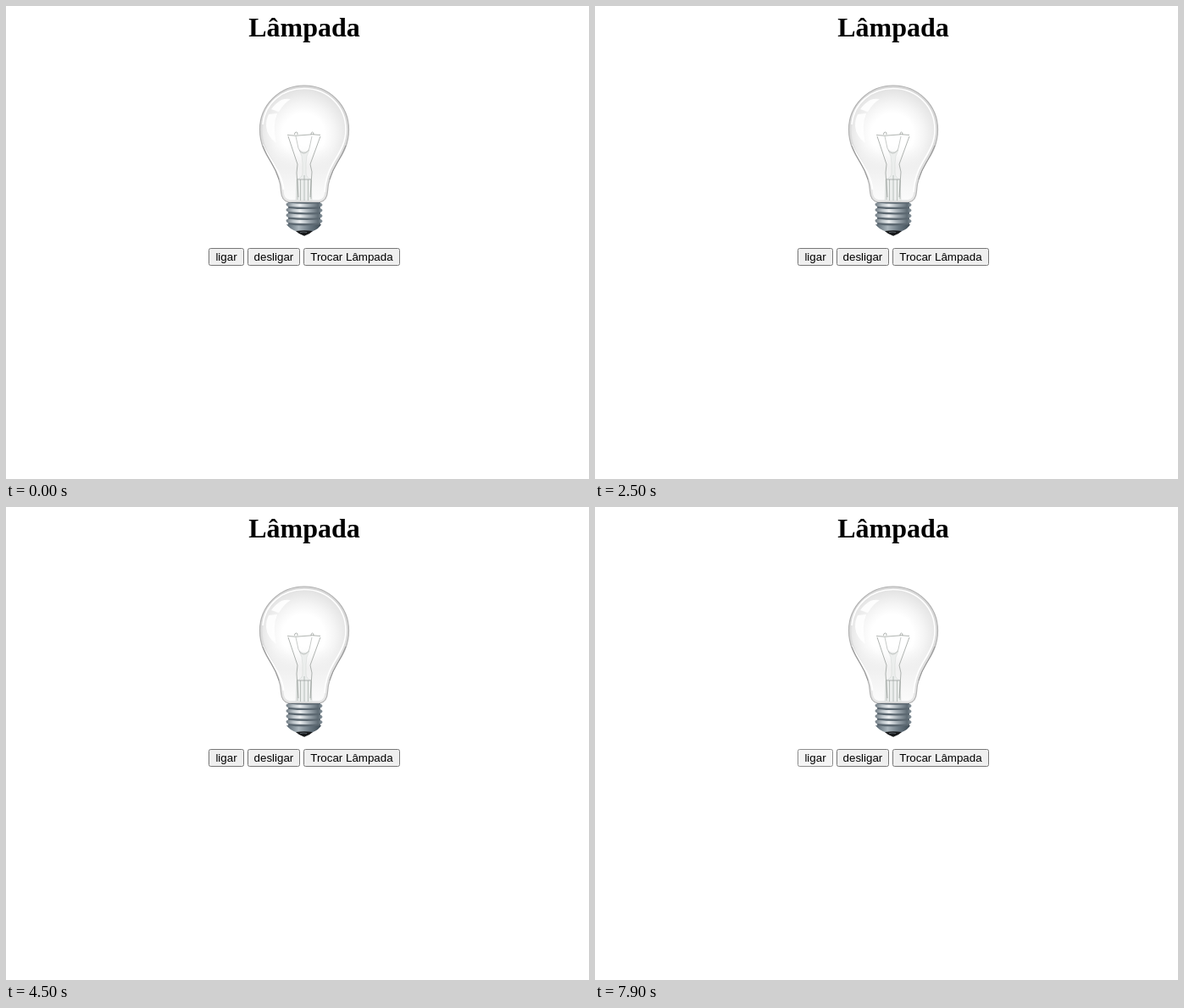
These frames come from a looping animation (688x559 px, 8000 ms). An HTML page:

```html
<!DOCTYPE html>
<html lang="pt">
<head>
<meta charset="utf-8">
<title>Lâmpada</title>
<style>
  html, body { margin: 0; width: 100%; height: 100%; overflow: hidden; background: #fff; }
  h1, svg, .row { position: absolute; margin: 0; pointer-events: none; }
  h1, .row { left: 16px; right: 0; text-align: center; white-space: nowrap; }
  h1 { top: 7px; font: bold 32px/37px "Liberation Serif", "Times New Roman", serif; color: #000; }
  svg { left: 0; top: 0; width: 100%; height: 100%; }
  .row { top: 286px; height: 21px; font: 16px/21px "Liberation Serif", "Times New Roman", serif; }
  button {
    appearance: none; box-sizing: border-box; height: 21px; margin: 0; padding: 2px 7px;
    vertical-align: top; color: #000; background: #efefef;
    border: 1px solid #767676; border-radius: 2.5px;
    font: 13.3333px/15px "Liberation Sans", Arial, sans-serif;
  }
</style>
</head>
<body>
<h1>Lâmpada</h1>

<svg viewBox="0 0 688 559" fill="none">
  <defs>
    <path id="glass" d="M352 94C381 94 404.500 117 404.500 146C404.500 163 398 174 391 185C383 198 380 207 379.500 219C379 227 376 231 370 232H334C328 231 325 227 324.500 219C324 207 321 198 313 185C306 174 299.500 163 299.500 146C299.500 117 323 94 352 94Z"/>
    <clipPath id="inside"><use href="#glass"/></clipPath>
    <radialGradient id="grayBall" gradientUnits="userSpaceOnUse" cx="351" cy="152" r="60">
      <stop offset=".42" stop-color="#fff"/>
      <stop offset=".62" stop-color="#f5f5f5"/>
      <stop offset=".85" stop-color="#e6e6e6"/>
      <stop offset="1" stop-color="#d8d8d8"/>
    </radialGradient>
    <linearGradient id="grayNeck" gradientUnits="userSpaceOnUse" x1="0" y1="165" x2="0" y2="232">
      <stop stop-color="#f3f3f3" stop-opacity="0"/>
      <stop offset=".4" stop-color="#f0f0f0"/>
      <stop offset="1" stop-color="#fcfcfc"/>
    </linearGradient>
    <radialGradient id="halo" gradientUnits="userSpaceOnUse" cx="352.500" cy="139" r="74">
      <stop offset=".6" stop-color="#ffff3c"/>
      <stop offset=".75" stop-color="#ffff62"/>
      <stop offset=".88" stop-color="#ffffa0"/>
      <stop offset=".97" stop-color="#ffffdc"/>
      <stop offset="1" stop-color="#fffff4"/>
    </radialGradient>
    <linearGradient id="fade" gradientUnits="userSpaceOnUse" x1="0" y1="155" x2="0" y2="208">
      <stop stop-color="#fff" stop-opacity="0"/>
      <stop offset="1" stop-color="#fff"/>
    </linearGradient>
    <radialGradient id="goldBall" gradientUnits="userSpaceOnUse" cx="351" cy="147" r="64">
      <stop offset=".12" stop-color="#fff"/>
      <stop offset=".26" stop-color="#ffffc8"/>
      <stop offset=".5" stop-color="#fffc8c"/>
      <stop offset=".66" stop-color="#fff250"/>
      <stop offset=".88" stop-color="#ffdc14"/>
    </radialGradient>
    <linearGradient id="goldNeck" gradientUnits="userSpaceOnUse" x1="0" y1="178" x2="0" y2="231">
      <stop stop-color="#ffee3c" stop-opacity="0"/>
      <stop offset=".4" stop-color="#ffdc1e" stop-opacity=".8"/>
      <stop offset="1" stop-color="#ffaa00"/>
    </linearGradient>
    <linearGradient id="metal">
      <stop stop-color="#6f7a82"/>
      <stop offset=".2" stop-color="#bcc4c9"/>
      <stop offset=".38" stop-color="#eceff1"/>
      <stop offset=".62" stop-color="#a2acb3"/>
      <stop offset=".88" stop-color="#5f6c75"/>
      <stop offset="1" stop-color="#88949b"/>
    </linearGradient>
    <linearGradient id="cone">
      <stop stop-color="#52606a"/>
      <stop offset=".35" stop-color="#aab5bc"/>
      <stop offset=".65" stop-color="#6d7b85"/>
      <stop offset="1" stop-color="#3d4a53"/>
    </linearGradient>
    <g id="shine" fill="#fff">
      <path d="M325 111Q330 109 336 110Q328 115 322 125L313 122Q318 115 325 111Z"/>
      <path d="M310 128L320 127Q314 142 319 162Q308 154 307 142Q307 134 310 128Z"/>
    </g>
    <path id="rim" d="M303 140C305 115 326 97.500 352 97.500C380 97.500 401 119 401 146C401 162 394 172 387 184C379 197 376.500 207 376 220"/>
    <g id="wires" stroke-width=".7">
      <path d="M332 152.500Q342 154 352 152.500T371 152.500M333 154L344 187L343 197L345 226M371 154L359 187L361 196L359 226"/>
      <path d="M340.500 152Q340.500 149 342.500 149T344 152M360 152Q360 149 361.500 149T363 152"/>
      <path d="M342 154L345 168Q347 174 351 174Q356 174 358 168L361 154" stroke-width=".5"/>
    </g>
    <path id="stem" d="M346 170Q352 175 358 170Q354 177 354 186V197Q354 203 360 205L361 230H342L343 205Q350 203 350 197V186Q350 177 346 170Z"/>
  </defs>

  <g id="off">
    <use href="#glass" fill="url(#grayBall)"/>
    <use href="#glass" fill="url(#grayNeck)"/>
    <g clip-path="url(#inside)">
      <use href="#glass" stroke="#d2d2d2" stroke-width="6" opacity=".5"/>
      <use href="#rim" stroke="#fff" stroke-width="1.6"/>
      <path d="M303 164C308 178 325 194 327.500 217" stroke="#fff" stroke-width="2"/>
    </g>
    <use href="#shine" opacity=".9"/>
    <use href="#stem" fill="#eceeed" stroke="#d0d4d2" stroke-width=".5"/>
    <path d="M344 206V229M347.500 205V230M352 200V230M356.500 205V230M360 206V228" stroke="#b4b9b6" stroke-width=".9"/>
    <path d="M343.500 205H360" stroke="#909693" stroke-width=".7"/>
    <use href="#wires" stroke="#8e9490"/>
    <use href="#glass" stroke="#b2b2b2" stroke-width="1.2"/>
    <path d="M303 165Q307 175 313 185T322 205M401 165Q397 175 391 185T382 205" stroke="#949494" stroke-width=".9"/>
  </g>

  <g id="on" opacity="0">
    <circle cx="352.500" cy="139" r="74" fill="url(#halo)"/>
    <path d="M278 155H428V216H278Z" fill="url(#fade)"/>
    <use href="#glass" fill="url(#goldBall)"/>
    <use href="#glass" fill="url(#goldNeck)"/>
    <g clip-path="url(#inside)">
      <use href="#glass" stroke="#ffb800" stroke-width="7" opacity=".6"/>
      <use href="#rim" stroke="#fffbd0" stroke-width="1.7"/>
      <path d="M303 164C308 178 325 194 328 220" stroke="#ffee40" stroke-width="2"/>
    </g>
    <use href="#shine" opacity=".92"/>
    <use href="#stem" fill="#fff47a" stroke="#f6d840" stroke-width=".5"/>
    <path d="M345 206V229M350 204V230M358 206V228" stroke="#fffbd8" stroke-width="2"/>
    <path d="M344 205Q352 200 360 205M347.500 207V229M355 207V229" stroke="#e8c020" stroke-width=".7"/>
    <use href="#wires" stroke="#8c8768"/>
    <use href="#glass" stroke="#f7a200" stroke-width="1.8"/>
  </g>

  <g id="base">
    <path d="M333 232H371V260H333Z" fill="#5c6871"/>
    <g id="threads"></g>
    <path d="M331 258Q352 261 372 258Q370 263 361 266.500H343Q334 263 331 258Z" fill="url(#cone)"/>
    <path d="M342 266Q352 264.500 362 266Q358 270 352 271.700Q346 270 342 266Z" fill="#17191b"/>
    <path d="M347 267.500Q351 266.500 355 267.500" stroke="#596067" stroke-width="1"/>
  </g>
</svg>

<div class="row"><button id="ligar">ligar</button> <button>desligar</button> <button id="trocar">Trocar Lâmpada</button></div>

<script>
  const LOOP = 8000;
  const $ = id => document.getElementById(id);

  // screw threads
  let rings = '';
  for (let i = 0; i < 4; i++) {
    const y = 232.5 + i * 6.4;
    rings += `<path d="M332 ${y}Q352 ${y + 2} 372 ${y + 0.6}Q375 ${y + 2.6} 372 ${y + 4.6}` +
      `Q352 ${y + 6.2} 332 ${y + 4.2}Q329 ${y + 2} 332 ${y}Z" fill="url(#metal)"/>`;
  }
  $('threads').innerHTML = rings;

  // each step is [time in ms, style] and holds until the next one
  function play(el, steps) {
    const frames = steps.map(([ms, style]) => ({ ...style, offset: ms / LOOP, easing: 'step-end' }));
    frames.push({ ...steps[steps.length - 1][1], offset: 1 });
    el.animate(frames, { duration: LOOP, iterations: Infinity });
  }

  const look = (backgroundColor, borderColor) => ({ backgroundColor, borderColor });
  const idle = look('#efefef', '#767676');
  const hover = look('#e5e5e5', '#4f4f4f');
  const pressed = look('#f5f5f5', '#8d8d8d');

  const toggles = [0, 1500, 2500, 3300, 4500, 5700, 6000];
  const lit = first => toggles.map((ms, i) => [ms, { opacity: (i + first) % 2 }]);

  play($('on'), lit(0));
  play($('off'), lit(1));
  play($('trocar'), [[0, idle], [1100, hover], [1500, idle]]);
  play($('ligar'), [[0, idle], [7300, hover], [7900, pressed]]);
</script>
</body>
</html>
```
